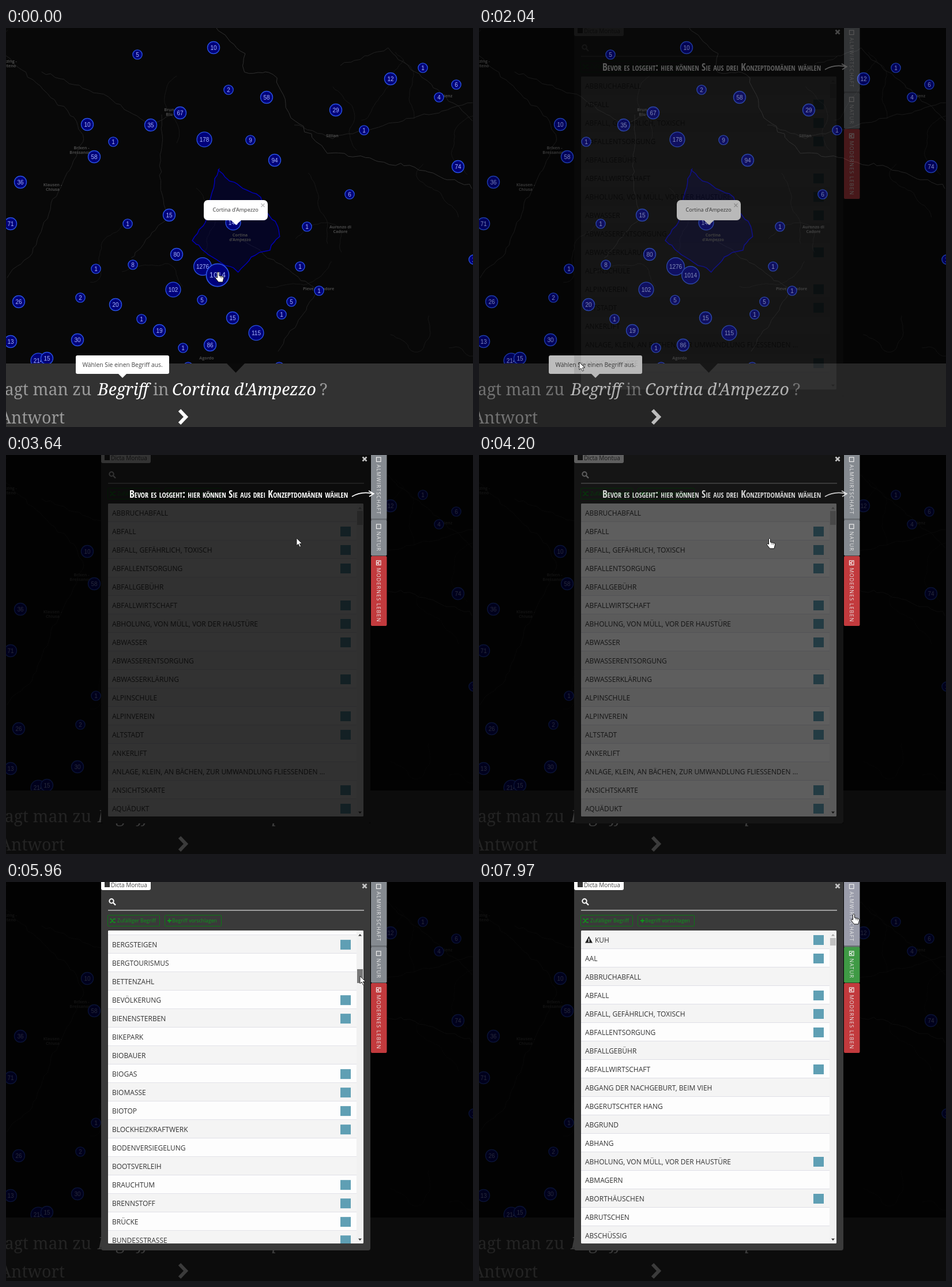
Recreate the animation shown at these times as an HTML page. Size 810x691 px, loop 8000 ms.

```html
<!DOCTYPE html>
<html lang="de">
<head>
<meta charset="utf-8">
<style>
  html, body { margin: 0; width: 100%; height: 100%; overflow: hidden; background: #080808; }
  svg { display: block; width: 100%; height: 100%; }
  text { font-family: "Open Sans", "Noto Sans", sans-serif; }
  .marker text { font: 10px "Liberation Sans", Arial, sans-serif; fill: #a9b8ff; text-anchor: middle; }
  .marker circle { fill: #00007a; stroke: #2950e0; stroke-width: 1.4; }
  .place { font-size: 7.1px; font-weight: 700; fill: #484848; text-anchor: middle; }
  .phrase text { font: 28.5px "Noto Serif", serif; fill: #999; }
  .phrase .pick { font-style: italic; fill: #fff; }
  .row { font-size: 12px; fill: #333; }
  .green { font-size: 8.7px; fill: #0a9a18; }
  .tab text { font-size: 9px; letter-spacing: 1.1px; fill: #e8e8e8; }
  #hint { font-size: 16px; font-family: "Open Sans Condensed", "Liberation Sans Narrow", "Open Sans", sans-serif;
    font-stretch: 75%; font-weight: 700; font-variant: small-caps; fill: #fff; }
</style>
</head>
<body>
<svg id="stage" viewBox="0 0 810 691"></svg>
<script>
const ROW = 32, LOOP = 8000;

let seed = 7;
const random = () => (seed = seed * 16807 % 2147483647) / 2147483647;
const jitter = size => (random() - .5) * size;

const rect = (x, y, w, h, fill, rest = '') =>
  `<rect x="${x}" y="${y}" width="${w}" height="${h}" fill="${fill}" ${rest}/>`;
const label = (x, y, text, rest = '') => `<text x="${x}" y="${y}" ${rest}>${text}</text>`;
const line = (d, stroke, width = 1, rest = '') =>
  `<path d="${d}" fill="none" stroke="${stroke}" stroke-width="${width}" ${rest}/>`;
const parse = list => list.trim().split(/\s+/).map(s => s.split(','));

// Straight legs between points, roughened a little.
function rough(list, size) {
  const p = parse(list);
  let d = 'M' + p[0];
  for (let i = 1; i < p.length; i++) {
    const [x0, y0] = p[i - 1].map(Number), [x1, y1] = p[i].map(Number);
    const steps = Math.ceil(Math.hypot(x1 - x0, y1 - y0) / 9);
    for (let k = 1; k <= steps; k++) {
      const f = k / steps;
      d += `L${(x0 + (x1 - x0) * f + jitter(size)).toFixed(1)} ${(y0 + (y1 - y0) * f + jitter(size)).toFixed(1)}`;
    }
  }
  return d;
}

// A side valley wandering from a random start.
function stream() {
  let x = random() * 810, y = random() * 580, angle = random() * 7, d = `M${x} ${y}`;
  for (let i = 0; i < 22; i++) {
    angle += jitter(1);
    d += `L${(x += 6 * Math.cos(angle)).toFixed(1)} ${(y += 6 * Math.sin(angle)).toFixed(1)}`;
  }
  return line(d, '#171717');
}

const roads = Array.from({ length: 16 }, stream).join('') + [
  '0,48 112,150 136,190 86,290 45,390 0,432',
  '302,147 250,168 175,120 60,75',
  '270,150 268,265 278,330 215,400',
  '580,65 662,36 810,160',
  '500,168 566,190 810,130',
  '404,362 543,455 470,560'
].map(p => line(rough(p, 5), '#222')).join('') +
  line(rough('365,0 415,45 412,76 466,80 494,155 560,215 700,240 810,276', 6), '#303030');

const place = (x, y, names) => names.split('/').map((s, i) => label(x, y + 8 * i, s, 'class="place"')).join('');
const places = place(8, 60, 'rzing -/iteno') + place(283, 144, 'Brun/Blu') +
  place(131, 210, 'Brixen -/Bressanone') + place(81, 274, 'Klausen -/Chiusa') +
  place(566, 189, 'Sillian') + place(767, 120, 'ienz') + place(580, 347, 'Auronzo di/Cadore') +
  place(406, 361, "Cortina/d'Ampezzo") + place(542, 454, 'Pieve di Cadore') + place(348, 574, 'Agordo');

// Clusters as x,y,count; places with a single entry as x,y.
const clusters = parse(`228,46,5 360,34,10 386,107,2 452,120,58 667,88,12 781,98,6 751,120,4 572,142,29
  302,147,67 141,167,10 251,168,35 153,223,58 344,193,178 424,194,9 466,229,94 784,240,74 25,267,36
  596,288,6 283,324,15 8,339,71 394,337,146 296,392,80 220,410,8 341,413,1276 290,453,102 129,467,2
  22,474,26 190,479,20 340,471,5 495,474,5 393,502,15 266,524,19 434,528,115 8,543,13 124,540,30
  354,549,86 56,576,214 71,572,15`);
const singles = parse(`723,69 621,177 186,197 211,339 522,344 156,417 510,413 543,455 478,496 235,504
  307,554 316,587 474,587 811,401`);

const marker = ([x, y, n = '1'], id = '') => `<g class="marker" ${id}>
  <circle cx="${x}" cy="${y}" r="${5.7 + 2.4 * n.length}"/>${label(x, +y + 3.5, n)}</g>`;

const region = `<path d="${rough('368,246 388,264 441,292 447,315 468,335 474,360 458,383 433,392 403,421 365,402 322,368 345,335 368,246', 4)}Z"
  fill="#00005a" fill-opacity=".35" stroke="#0000b4" stroke-width="1.5"/>`;

const map = rect(0, 0, 810, 691, '#080808') + roads + region + places +
  [...clusters, ...singles].map(m => marker(m)).join('') + marker(['367', '428', '1014'], 'id="bigMarker"') +
  rect(343, 298, 111, 35, '#fff', 'rx="7"') + '<path d="M389 332h20l-10 9z" fill="#fff"/>' +
  label(358.5, 318, "Cortina d'Ampezzo", 'font-size="9.1" fill="#333"') +
  line('M442.5 304l6 6m0-6l-6 6', '#bbb', 1.4);

const bar = rect(0, 581, 810, 110, '#323232') + '<path d="M383 581h31l-15.5 16z" fill="#0a0a0a"/>' +
  `<g class="phrase">${label(148, 636, 'agt man zu', 'text-anchor="end"')}
  ${label(159, 636, 'Begriff', 'class="pick"')}${label(255, 636, 'in')}
  ${label(288, 636, "Cortina d'Ampezzo", 'class="pick"')}${label(544, 636, '?')}
  ${label(102, 685, 'Antwort', 'text-anchor="end"')}</g>` + line('M301 662l11 11.5l-11 11.5', '#fff', 6) +
  `<g id="tip">${rect(121, 567, 162, 32, '#fff', 'rx="3"')}<path d="M194 598h16l-8 8z" fill="#fff"/>
  ${label(132.5, 587, 'Wählen Sie einen Begriff aus.', 'font-size="10.3" fill="#444"')}</g>`;

// A trailing * marks entries that carry a badge.
const modern = (`ABBRUCHABFALL|ABFALL*|ABFALL, GEFÄHRLICH, TOXISCH*|ABFALLENTSORGUNG*|ABFALLGEBÜHR|ABFALLWIRTSCHAFT*|` +
`ABHOLUNG, VON MÜLL, VOR DER HAUSTÜRE*|ABWASSER*|ABWASSERENTSORGUNG|ABWASSERKLÄRUNG*|ALPINSCHULE|ALPINVEREIN*|` +
`ALTSTADT*|ANKERLIFT|ANLAGE, KLEIN, AN BÄCHEN, ZUR UMWANDLUNG FLIESSENDEN ...|ANSICHTSKARTE*|AQUÄDUKT*|` +
`ARBEITSLOSIGKEIT|ARCHITEKTUR*|ARTENSCHUTZ*|ASPHALT*|AUFFORSTUNG|AUSFLUG*|AUSFLUGSZIEL|AUSSICHT|AUSSICHTSPUNKT*|AUTOBAHN*|` +
`BACHVERBAUUNG|BAHNHOF*|BAUERNHOF*|BAUGEBIET|BAULAND*|BAUSTELLE*|BERGBAHN*|BERGFÜHRER*|BERGHÜTTE*|BERGRETTUNG*|` +
`BERGSCHULE|BERGSTEIGEN*|BERGTOURISMUS|BETTENZAHL|BEVÖLKERUNG*|BIENENSTERBEN*|BIKEPARK|BIOBAUER|BIOGAS*|BIOMASSE*|` +
`BIOTOP*|BLOCKHEIZKRAFTWERK*|BODENVERSIEGELUNG|BOOTSVERLEIH|BRAUCHTUM*|BRENNSTOFF*|BRÜCKE*|BUNDESSTRASSE*|BUSHALTESTELLE*|CAMPINGPLATZ*|` +
`CARSHARING*|CHALET*|DAMM*|DAUERSIEDLUNG|DENKMAL*|DEPONIE*|DIREKTVERMARKTUNG|DORFERNEUERUNG|DORFPLATZ|DÜNGER*|` +
`EINHEIMISCHER|EINKAUFSZENTRUM*|EISKLETTERN*|EISLAUFPLATZ|ELEKTRIZITÄT*|ELEKTROAUTO*|EMISSION*|ENERGIE*|ENERGIEWENDE*|ENTSORGUNG|` +
`ERBE*|ERDGAS*|ERDWÄRME*|ERHOLUNG*|EROSION*|ERSCHLIESSUNG|FAHRRADWEG*|FAMILIENURLAUB|FEINSTAUB*|FERIEN*|FERIENDORF|FERIENGAST|FERIENHAUS*|` +
`FERIENWOHNUNG*|FERNWÄRME*|FLASCHENPFAND|FOLKLORE*|FORSTPOLIZEI|FREESTYLE SKI*|FREIZEIT*|FREMDENFÜHRER*|FRISCHE LUFT|` +
`FUNGIZID*|FUSSGÄNGERZONE*|GÄSTEKARTE|GASTFREUNDSCHAFT|GEOLOGISCHES ERBE|GEOPARK|` +
`GESAMTHEIT, DER ENTSCHEIDUNGEN UND ZIELE, EINER VERWAL...|GESAMTHEIT, DER ENTSCHEIDUNGEN UND ZIELE, EINER VERWAL...|GEWERBEGEBIET`).split('|');
const withNature = (`KUH*|AAL*|ABBRUCHABFALL|ABFALL*|ABFALL, GEFÄHRLICH, TOXISCH*|ABFALLENTSORGUNG*|ABFALLGEBÜHR|ABFALLWIRTSCHAFT*|` +
`ABGANG DER NACHGEBURT, BEIM VIEH|ABGERUTSCHTER HANG|ABGRUND|ABHANG|ABHOLUNG, VON MÜLL, VOR DER HAUSTÜRE*|ABMAGERN|` +
`ABORTHÄUSCHEN*|ABRUTSCHEN|ABSCHÜSSIG`).split('|');
const scrollEnd = modern.indexOf('FERIENWOHNUNG*') * ROW + 7;

const rows = words => words.map((word, i) => {
  const y = 84 + i * ROW, warned = word === 'KUH*';
  return `<g class="row">${rect(177, y, 431, ROW, i % 2 ? '#fdfdfd' : '#f4f4f4')}
    ${rect(177, y + ROW - 1, 431, 1, '#dfdfe6')}
    ${label(warned ? 201 : 184, y + 20.5, word.replace('*', ''))}
    ${warned ? `<path d="M190.5 ${y + 10}l6.5 11.5h-13z" fill="#222"/>` + rect(189.8, y + 14, 1.5, 6, '#fff') : ''}
    ${word.endsWith('*') ? rect(580, y + 8, 18, 17, '#5f9fb4') : ''}</g>`;
}).join('');

const button = (x, w, text, textX) =>
  rect(x + .5, 57.5, w, 19, 'none', 'rx="2" stroke="#087a12"') + label(textX, 70, text, 'class="green"');

const modal = rect(165, -8, 467, 646, '#3a3a3a', 'rx="4"') +
  rect(165, -5, 86, 19, '#fff', 'rx="3"') + rect(171, 0, 9, 9, '#333') +
  label(182, 9, 'Dicta Montua', 'font-size="10" fill="#444"') +
  '<circle cx="183" cy="33" r="3.7" fill="none" stroke="#fff" stroke-width="2"/>' +
  line('M186 36l4 4', '#fff', 2.4) + rect(177, 48.5, 444, 1, '#fff') +
  button(176, 90, 'Zufälliger Begriff', 193) + button(275, 98, 'Begriff vorschlagen', 288) +
  line('M180 64h2l5 6h3M180 70h2l5-6h3', '#0a9a18', 1.3) +
  line('M280 67h7M283.5 63.5v7', '#0a9a18', 2) +
  `<clipPath id="listClip">${rect(177, 84, 443, 542, '#fff', 'rx="2"')}</clipPath>
  <g clip-path="url(#listClip)">${rect(177, 84, 443, 542, '#fff')}
  <g id="modernList">${rows(modern)}</g><g id="natureList">${rows(withNature)}</g>
  <g id="pending">${rect(177, 597, 431, 30, '#f0f0f0')}</g>
  ${rect(608, 84, 12, 542, '#f1f1f1')}${rect(609, 97, 10, 24, '#c1c1c1', 'id="thumb"')}
  <path id="upArrow" d="M611 93.5h6l-3-3.5z"/><path d="M611 617.5h6l-3 3.5z" fill="#333"/></g>`;

const tab = (id, y, h, fill, text, checked) => `<g class="tab">
  ${rect(633, y, 27.5, h, fill, `id="${id}" rx="2"`)}
  ${rect(642.5, y + 8, 7.5, 7.5, 'none', 'stroke="#eee" stroke-width="1.2"')}
  ${line(`M648 ${y + 9.5}l-4 2.5l3.5 2`, '#fff', 1.4, `id="${id}Check" opacity="${checked}"`)}
  <text transform="translate(643 ${y + 20.5}) rotate(90)">${text}</text></g>`;

const tabs = tab('farming', -4, 115, '#858a90', 'ALMWIRTSCHAFT', 0) +
  tab('nature', 112, 62.5, '#858a90', 'NATUR', 0) + rect(633, 110, 27.5, 2.5, '#6a6e73') +
  tab('living', 175, 121, '#c23a3d', 'MODERNES LEBEN', 1);

stage.innerHTML = map + bar +
  `<g id="dialog">${rect(0, 0, 810, 691, '#000', 'opacity=".77"')}${modal}
  <g id="veil">${rect(165, 0, 467, 638, '#000', 'opacity=".8"')}
  ${label(214, 74, 'Bevor es losgeht: hier können Sie aus drei Konzeptdomänen wählen', 'id="hint"')}</g>
  ${line('M618.5 3.5l7 7m0-7l-7 7', '#c4c4c4', 2.6)}${tabs}
  <g id="pointer">${line('M600 72Q616 62 638 67M629 62L638 67L630 72', '#fff', 1.6)}</g></g>
  <path id="arrow" d="M0 0v13l3-2.8l2.3 5l2.2-1l-2.2-4.7h4.2z" fill="#fff" stroke="#111" stroke-width=".8"/>
  <g id="hand"><path d="M-1.5 1.5Q0-1 1.5 1.5V7L7 8Q10 8.5 9.5 11.5L8 18H.5L-4.5 11.5Q-5 8.5-1.5 10.5Z"
  fill="#fff" stroke="#111"/>${line('M4 8v3M6.5 8.5v3', '#333', .8)}</g>`;

const $ = id => document.getElementById(id);
const set = (id, name, value) => $(id).setAttribute(name, value);
const show = (id, amount) => set(id, 'opacity', +amount);

// Choose the type size at which the hint ends before the drawn arrow.
$('hint').style.fontSize = Math.min(24, 16 * 379 / $('hint').getComputedTextLength()) + 'px';

const ramp = (t, from, to) => Math.min(1, Math.max(0, (t - from) / (to - from)));
const ease = f => f * f * (3 - 2 * f);

// Cursor moves: start time, end time, destination.
const moves = [
  [120, 1420, 174, 579], [2400, 3640, 504, 144], [4600, 5000, 535, 136], [5000, 5360, 614, 109],
  [5480, 6560, 614, 238], [6700, 7040, 645, 140], [7440, 7960, 650, 55]
];

function cursorAt(t) {
  let x = 368, y = 422;
  for (const [from, to, toX, toY] of moves) {
    const f = ease(ramp(t, from, to));
    x += (toX - x) * f;
    y += (toY - y) * f;
  }
  return [x, y];
}

function draw(t) {
  const [x, y] = cursorAt(t);
  const open = t < 2040 ? 0 : ramp(t, 1940, 2240);
  const veil = 1 - (t < 4200 ? 0 : ramp(t, 4100, 4560));
  const drag = ease(ramp(t, 5480, 6560));
  const natureOn = t >= 7160;
  const dragging = t >= 5400 && t < 6680;

  set('bigMarker', 'transform', t < 360 ? 'translate(367 428) scale(1.28) translate(-367 -428)' : '');
  show('tip', 1 - ramp(t, 2280, 2600));
  show('dialog', open);
  show('veil', veil);
  show('pointer', veil);
  show('pending', t < 2440);

  set('modernList', 'transform', `translate(0 ${-scrollEnd * drag})`);
  show('modernList', !natureOn);
  show('natureList', natureOn);
  set('thumb', 'y', natureOn ? 97 : 97 + 129 * drag);
  set('thumb', 'height', natureOn ? 13 : 24);
  set('thumb', 'fill', dragging ? '#787878' : '#c1c1c1');
  set('upArrow', 'fill', drag > 0 && !natureOn ? '#333' : '#a5a5a5');

  set('nature', 'fill', natureOn ? '#3f9a45' : '#858a90');
  show('natureCheck', natureOn);
  set('farming', 'fill', t > 7000 && y < 111 ? '#9a9caa' : '#858a90');

  const overLink = t < 2040 || (t >= 4200 && x < 606) || (t > 6700 && x > 632);
  for (const id of ['arrow', 'hand']) set(id, 'transform', `translate(${x} ${y})`);
  show('hand', overLink);
  show('arrow', !overLink);
}

const start = performance.now();
function tick() {
  draw((performance.now() - start) % LOOP);
  requestAnimationFrame(tick);
}
tick();
</script>
</body>
</html>
```
